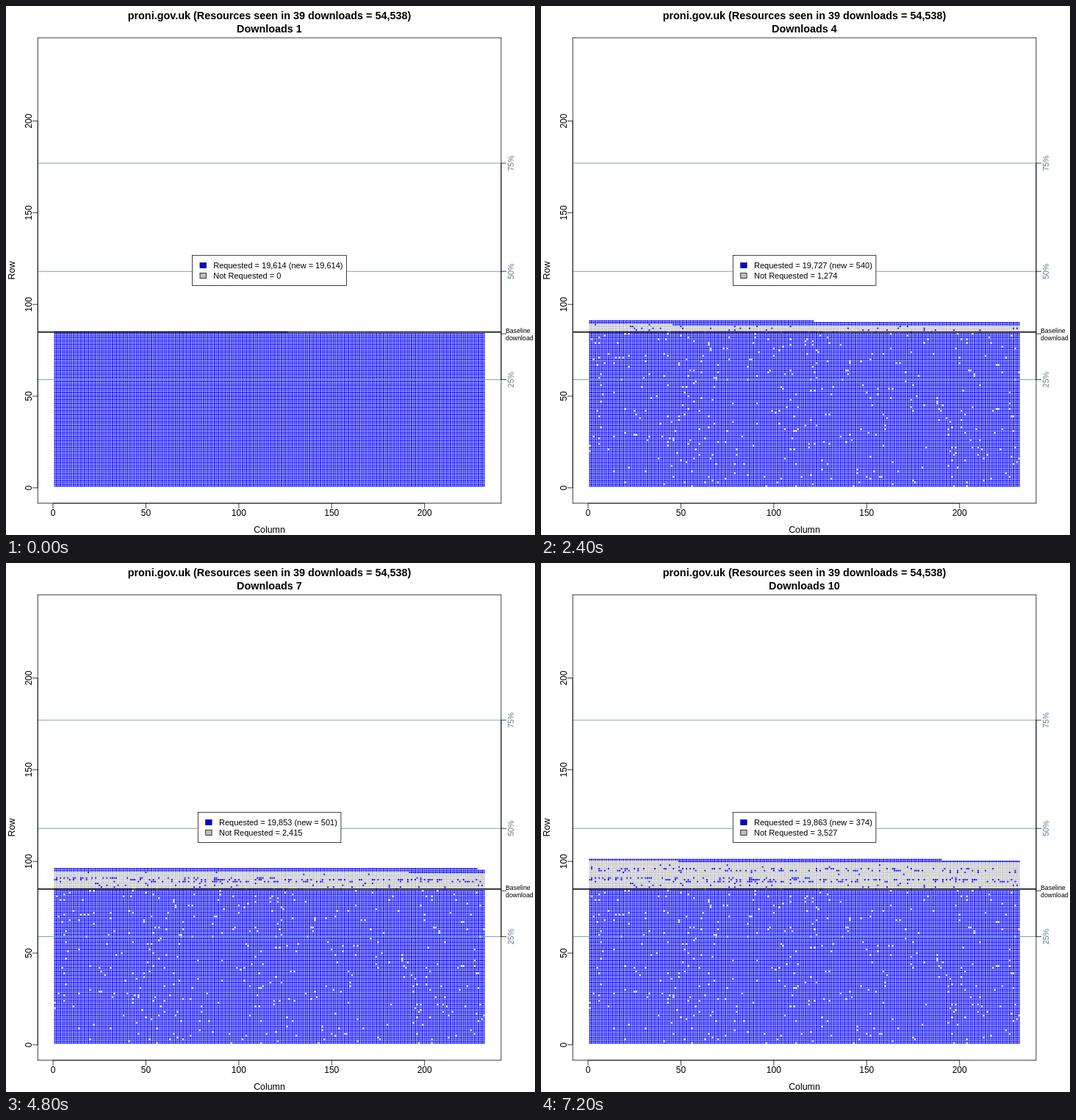
An HTML page with a canvas that plays this animation: 720 by 720 pixels, repeating every 8 s.

```html
<!DOCTYPE html>
<html>
<head>
<meta charset="utf-8">
<style>
html, body { margin: 0; width: 100%; height: 100%; overflow: hidden; background: #fff; }
canvas, svg { position: absolute; left: 0; top: 0; width: 720px; height: 720px; }
text { font-family: "Liberation Sans", Arial, sans-serif; }
</style>
</head>
<body>
<canvas id="dots" width="720" height="720"></canvas>
<svg id="plot" viewBox="0 0 720 720" xmlns="http://www.w3.org/2000/svg"></svg>
<script>
const COLS = 232, STEP = 800, BLUE = '#0000ff', GRAY = '#bebebe';
const LEFT = 43.2, RIGHT = 673.92, TOP = 43.2, BOTTOM = 676.8;
const SLATE = '#607b8b', TEAL = '#528b8b';
const X = c => 64.03 + c * 2.52814;
const Y = r => 655.83 - r * 2.49645;

// per download: requested, new, share of the new batch still requested later
const runs = [
  [19614, 19614, 0.977], [19616, 444, 0.06], [19622, 403, 0.04],
  [19727, 540, 0.26], [19724, 385, 0.02], [19720, 381, 0.015],
  [19853, 501, 0.21], [19855, 373, 0.012], [19856, 375, 0.008], [19863, 374, 0]
];
const ends = [];
runs.reduce((sum, run, i) => ends[i] = sum + run[1], 0);

// fixed random value for each resource
let seed = 39;
function random() {
  seed = (seed + 0x6d2b79f5) | 0;
  let t = Math.imul(seed ^ (seed >>> 15), seed | 1);
  t ^= t + Math.imul(t ^ (t >>> 7), t | 61);
  return ((t ^ (t >>> 14)) >>> 0) / 4294967296;
}
const chance = Array.from({ length: ends[9] }, random);

const svg = document.getElementById('plot');
function add(name, attrs, label) {
  const el = document.createElementNS(svg.namespaceURI, name);
  for (const k in attrs) el.setAttribute(k, attrs[k]);
  if (label !== undefined) el.textContent = label;
  svg.appendChild(el);
  return el;
}
const line = (x1, y1, x2, y2, stroke = '#000', width = 0.75) =>
  add('line', { x1, y1, x2, y2, stroke, 'stroke-width': width });
const rect = (x, y, width, height, fill) =>
  add('rect', { x, y, width, height, fill, stroke: '#000', 'stroke-width': 0.75 });
const text = (x, y, size, label, more) =>
  add('text', { x, y, 'font-size': size, ...more }, label);
const mid = { 'text-anchor': 'middle' };
const upright = (x, y, size, label, fill = '#000') =>
  text(x, y, size, label, { ...mid, fill, transform: `rotate(-90 ${x} ${y})` });

// frame, axes and guide lines
for (const q of [25, 50, 75]) {
  const y = Y(q * 2.36);
  line(LEFT, y, RIGHT, y, TEAL);
  line(RIGHT, y, 681.1, y);
  upright(691, y, 10.6, q + '%', SLATE);
}
line(LEFT, Y(85), RIGHT, Y(85), '#000', 1.5);
rect(LEFT, TOP, RIGHT - LEFT, BOTTOM - TOP, 'none');
line(RIGHT, Y(177), RIGHT, Y(59));
line(RIGHT, Y(84), 681.1, Y(84));
for (let v = 0; v <= 200; v += 50) {
  line(X(v), BOTTOM, X(v), 684);
  text(X(v), 694, 12, v, mid);
  line(36, Y(v), LEFT, Y(v));
  upright(35, Y(v), 12, v);
}
line(X(0), BOTTOM, X(200), BOTTOM);
line(LEFT, Y(0), LEFT, Y(200));
text(680, 445, 8.8, 'Baseline');
text(680, 455, 8.8, 'download');
text(358.5, 717, 12.4, 'Column', mid);
upright(12, 360, 12.4, 'Row');
const bold = { ...mid, 'font-weight': 'bold' };
text(358.5, 18, 14.4, 'proni.gov.uk (Resources seen in 39 downloads = 54,538)', bold);
const title = text(358.5, 36, 14.4, '', bold);

// legend
const box = rect(0, 339.3, 0, 41.3, '#fff');
const keys = [rect(0, 349.6, 8.4, 6.8, BLUE), rect(0, 363.6, 8.4, 6.8, GRAY)];
const labels = [text(0, 357, 11, ''), text(0, 371, 11, '')];

const ctx = document.getElementById('dots').getContext('2d');
const commas = n => n.toLocaleString('en-US');

function draw(d) {
  const [requested, fresh] = runs[d];
  const x = d ? 261.3 : 253.6;
  title.textContent = 'Downloads ' + (d + 1);
  box.setAttribute('x', x);
  box.setAttribute('width', 2 * (358.6 - x));
  keys.forEach(k => k.setAttribute('x', x + 10.4));
  labels.forEach(l => l.setAttribute('x', x + 28.7));
  labels[0].textContent = `Requested = ${commas(requested)} (new = ${commas(fresh)})`;
  labels[1].textContent = `Not Requested = ${commas(ends[d] - requested)}`;

  ctx.clearRect(0, 0, 720, 720);
  for (let i = 0, batch = 0; i < ends[d]; i++) {
    if (i >= ends[batch]) batch++;
    ctx.fillStyle = batch === d || chance[i] < runs[batch][2] ? BLUE : GRAY;
    ctx.fillRect(X(i % COLS + 1) - 1, Y(Math.floor(i / COLS) + 1) - 1, 2, 2);
  }
}

let shown = -1;
function tick() {
  const d = Math.floor(performance.now() / STEP) % runs.length;
  if (d !== shown) draw(shown = d);
  requestAnimationFrame(tick);
}
tick();
</script>
</body>
</html>
```
